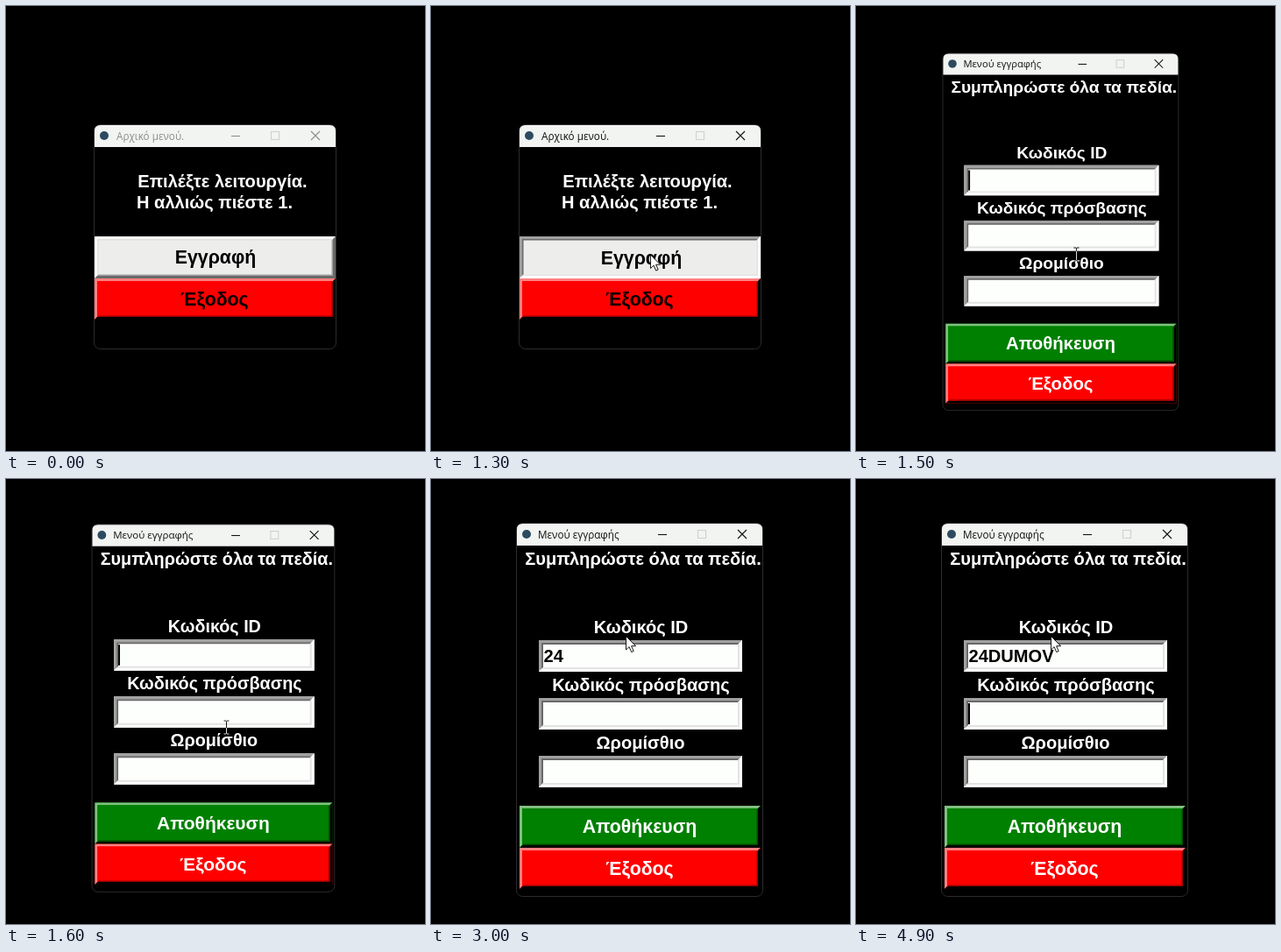
An HTML page that plays this animation: 478 by 508 pixels, repeating every 5000 ms.

```html
<!DOCTYPE html>
<html lang="el">
<head>
<meta charset="utf-8">
<title>Μενού</title>
<style>
  html, body { margin: 0; width: 100%; height: 100%; overflow: hidden; background: #000; }
  svg { display: block; }
  text { font-kerning: none; white-space: pre; }
  .body { font: bold 20.1px "Liberation Sans", Arial, sans-serif; }
  .button { font: bold 21.3px "Liberation Sans", Arial, sans-serif; }
  .title { font: 11.7px "Open Sans", "Noto Sans", sans-serif; }
  .ibeam { mix-blend-mode: difference; }
</style>
</head>
<body>
<svg id="stage" width="478" height="508" viewBox="0 0 478 508"></svg>
<script>
const stage = document.getElementById('stage');
const LOOP = 5000, STEP = 100;

const measure = document.createElement('canvas').getContext('2d');
measure.font = 'bold 20.1px "Liberation Sans", Arial, sans-serif';
measure.fontKerning = 'none';

// Edge colours: outer and inner top-left, then outer and inner bottom-right.
const SUNKEN = ['#a0a0a0', '#696969', '#fff', '#e3e3e3'];
const RAISED = ['#fff', '#e3e0dc', '#696969', '#a0a0a0'];
const RED = ['#ff8080', '#f00', '#000', '#900'];
const GREEN = ['#80c080', '#008000', '#000', '#004d00'];

// Mouse path: time, x, y
const PATH = [
  [400, 0, 315], [800, 272, 273], [900, 262, 281],
  [1000, 250, 283.5], [1800, 250, 283.5], [2000, 222, 179]
];
const KEYS = [
  [2300, '2'], [2400, '4'], [3600, 'D'], [3700, 'U'],
  [3900, 'M'], [4000, 'O'], [4100, 'V']
];
const OPENING = { 1500: 0.957, 1600: 0.985, 1700: 0.996 };

const rect = (x, y, w, h, fill) =>
  `<rect x="${x}" y="${y}" width="${w}" height="${h}" fill="${fill}"/>`;

const label = (str, x, y, cls = 'body', fill = '#fff', anchor = 'middle') =>
  `<text class="${cls}" x="${x}" y="${y}" fill="${fill}" text-anchor="${anchor}">${str}</text>`;

function ring(x, y, w, h, b, light, dark) {
  const r = x + w, d = y + h;
  return `<path fill="${light}" d="M${x} ${d}V${y}H${r}l${-b} ${b}H${x + b}V${d - b}z"/>` +
         `<path fill="${dark}" d="M${x} ${d}H${r}V${y}l${-b} ${b}V${d - b}H${x + b}z"/>`;
}

function bevel(x, y, w, h, face, [outTL, inTL, outBR, inBR], outer, inner) {
  return rect(x, y, w, h, face) +
    ring(x, y, w, h, outer, outTL, outBR) +
    ring(x + outer, y + outer, w - 2 * outer, h - 2 * outer, inner, inTL, inBR);
}

const button = (y, h, face, edges) => bevel(101, y, 275, h, face, edges, 3, 1.5);
const entry = y => bevel(123, y, 232, 36, '#fdfffc', SUNKEN, 3, 2);
const caret = (x, y) => rect(x, y, 2, 24, '#000');

function frame(x, y, w, h, title, titleX, closeX, active) {
  const mid = y + 12.5, ink = active ? '#111' : '#8c8c8c';
  return `<rect x="${x}" y="${y}" width="${w}" height="${h}" rx="7" fill="#000" stroke="#2c2c2c"/>
    <path d="M${x + .5} ${y + 25.5}V${y + 7}q0-6.5 6.5-6.5H${x + w - 7}q6.5 0 6.5 6.5V${y + 25.5}z" fill="#f1f4f1"/>
    <circle cx="${x + 11.5}" cy="${mid}" r="5" fill="#2d4a60"/>
    ${label(title, titleX, mid + 4.5, 'title', ink, 'start')}
    <g fill="none" stroke="${ink}" stroke-width="1.1">
      <path d="M${closeX - 96} ${mid + .5}h10"/>
      <rect x="${closeX - 50.5}" y="${mid - 4.5}" width="9" height="9" stroke="#cfd1cf"/>
      <path d="M${closeX - 5} ${mid - 5}l10 10m0-10l-10 10"/>
    </g>`;
}

function mainMenu(pressed, active) {
  const shift = pressed ? 1 : 0;
  return frame(100.5, 135.5, 276, 256, 'Αρχικό μενού.', 126, 353, active) +
    label('Επιλέξτε λειτουργία.', 247, 207) +
    label('Η αλλιώς πιέστε 1.', 238, 231) +
    button(263, 48, '#edeeec', pressed ? SUNKEN : RAISED) +
    label('Εγγραφή', 239 + shift, 294 + shift, 'button', '#000') +
    button(311, 47, '#f00', RED) +
    label('Έξοδος', 238, 342, 'button', '#000');
}

function caretAt(t, typed) {
  if (t >= 4900) return caret(128, 256);
  const visible = t < 2100 || (t >= 2300 && t < 3000) || (t >= 3300 && t < 4800);
  return visible ? caret(128 + measure.measureText(typed).width, 190) : '';
}

function signUp(t) {
  const typed = KEYS.filter(([at]) => t >= at).map(([, key]) => key).join('');
  return frame(97.5, 50.5, 281, 426, 'Μενού εγγραφής', 122, 355, true) +
    label('Συμπληρώστε όλα τα πεδία.', 242, 98) +
    label('Κωδικός ID', 239.5, 176) + entry(184) +
    label('Κωδικός πρόσβασης', 239.5, 242) + entry(250) +
    label('Ωρομίσθιο', 239, 308) + entry(316) +
    label(typed, 128.5, 209, 'body', '#000', 'start') + caretAt(t, typed) +
    button(373, 48, '#008000', GREEN) +
    label('Αποθήκευση', 238, 404, 'button') +
    button(421, 47, '#f00', RED) +
    label('Έξοδος', 238, 452, 'button');
}

function pointer(t) {
  if (t < PATH[0][0]) return '';
  let [, x, y] = PATH[PATH.length - 1];
  const next = PATH.findIndex(p => p[0] > t);
  if (next > 0) {
    const [t0, x0, y0] = PATH[next - 1], [t1, x1, y1] = PATH[next];
    const k = (t - t0) / (t1 - t0);
    x = x0 + (x1 - x0) * k;
    y = y0 + (y1 - y0) * k;
  }
  if (t >= 1500 && t < 1900)
    return `<path class="ibeam" transform="translate(${x + 1.5} ${y})" fill="none" stroke="#ddd"
      d="M-3-7.5h2.5l.5.5.5-.5H3M0-7V7M-3 7.5h2.5l.5-.5.5.5H3"/>`;
  return `<path transform="translate(${x} ${y})" fill="#fff" stroke="#000" stroke-width=".9"
    d="M.5.5V16l3.6-3.4 2.6 6 2.5-1.1-2.6-5.8h5z"/>`;
}

function scene(t) {
  if (t < 1400) return mainMenu(t >= 1300, t >= 1300);
  if (t < 1500) return `<g opacity=".5">${mainMenu(false, true)}</g>`;
  const s = OPENING[t] || 1;
  return `<g transform="translate(132 132) scale(${s}) translate(-132 -132)">${signUp(t)}</g>`;
}

let shown = -1;
function draw(now) {
  const t = Math.floor(now % LOOP / STEP) * STEP;
  if (t !== shown) {
    shown = t;
    stage.innerHTML = rect(0, 0, 478, 508, '#000') + scene(t) + pointer(t);
  }
}

const start = performance.now();
function tick() {
  draw(performance.now() - start);
  requestAnimationFrame(tick);
}
tick();
</script>
</body>
</html>
```
